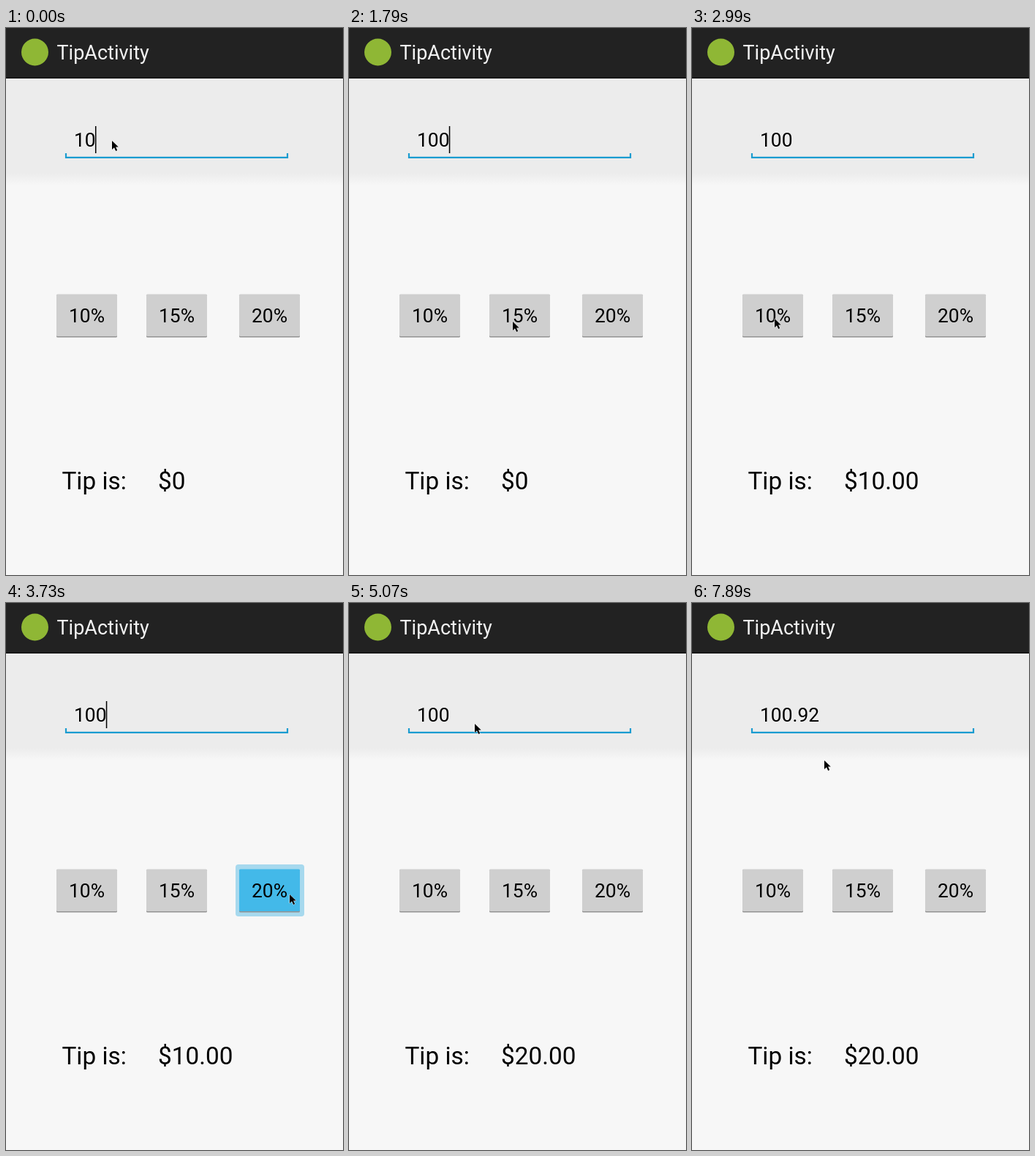
These frames come from a looping animation (461 px wide and 747 px high, 8000 ms). An HTML page:

```html
<!DOCTYPE html>
<html lang="en">
<head>
<meta charset="utf-8">
<title>TipActivity</title>
<style>
  html, body { margin: 0; width: 100%; height: 100%; overflow: hidden; background: #f7f7f7; }
  svg { display: block; width: 100%; height: 100%; }
  text { font-family: Roboto, sans-serif; font-size: 26.4px; white-space: pre; }
  .title { font-size: 27px; fill: #f2f2f2; }
  .result { font-size: 33.3px; }
</style>
</head>
<body>
<svg viewBox="0 0 461 747">
  <defs>
    <linearGradient id="fade" x2="0" y2="1">
      <stop stop-color="#ececec"/>
      <stop offset="1" stop-color="#f7f7f7"/>
    </linearGradient>
  </defs>
  <rect width="461" height="747" fill="#f7f7f7"/>
  <rect width="461" height="198" fill="#ececec"/>
  <rect y="198" width="461" height="17" fill="url(#fade)"/>
  <rect width="461" height="69" fill="#222"/>
  <rect y="67" width="461" height="2" fill="#181818"/>
  <circle cx="39.5" cy="33" r="18.5" fill="#8fb735"/>
  <text class="title" x="69.5" y="43">TipActivity</text>

  <path d="M82 171v5.8h303v-5.8" fill="none" stroke="#1a9cd0" stroke-width="2.2"/>
  <text id="field" x="93" y="162.3"></text>
  <rect id="caret" y="134" width="1.5" height="37"/>
  <path id="handle" d="M0 172L20 193V230Q20 233 17 233H-17Q-20 233 -20 230V193Z" fill="#33b5e5"/>

  <g id="buttons"></g>
  <text class="result" x="76.5" y="630">Tip is:</text>
  <text class="result" id="tip" x="208" y="630"></text>
  <path id="mouse" d="M0 0V12L3 9.3L5.2 14L7.2 13L5.1 8.6H8.8Z" stroke="#fff" paint-order="stroke"/>
</svg>
<script>
// All times in ms; the screen refreshes once per STEP
const LOOP = 8000, STEP = 148.8, BLINK = 505;
const $ = id => document.getElementById(id);

const edits = [
  { at: -360, text: '10' },
  { at: 380, text: '100' },
  { at: 5720, text: '100.' },
  { at: 6620, text: '100.9' },
  { at: 7250, text: '100.92' }
];
const clicks = [
  { at: 2000, percent: 15, hold: 150 },
  { at: 2900, percent: 10, hold: 0 },
  { at: 3800, percent: 20, hold: 150 }
];
const moves = [
  { from: 1040, to: 1780, x: 224, y: 401 },
  { from: 2230, to: 2520, x: 113, y: 397 },
  { from: 3120, to: 3710, x: 388, y: 398 },
  { from: 3870, to: 4605, x: 172, y: 165 },
  { from: 7740, to: 7880, x: 181, y: 215 }
];
const handleTime = { from: 5150, to: 5900 };

const latest = (list, t) => list.findLast(e => e.at <= t);
const within = (t, a, b) => t >= a && t < b;
const easeOut = k => 1 - (1 - k) ** 1.5;

function pointer(t) {
  let x = 145, y = 154;
  for (const m of moves) {
    const k = easeOut(Math.min(1, Math.max(0, (t - m.from) / (m.to - m.from))));
    x += (m.x - x) * k;
    y += (m.y - y) * k;
  }
  return [x, y];
}

const buttons = [[10, 69], [15, 192], [20, 319]].map(([percent, x]) => {
  const g = document.createElementNS('http://www.w3.org/2000/svg', 'g');
  g.setAttribute('transform', `translate(${x} 363)`);
  g.innerHTML = `
    <rect class="glow" x="-5" y="-6" width="94" height="71" rx="4" fill="#a7d9ee"/>
    <rect y="1" width="83" height="58.5" rx="1.5" fill="#929292"/>
    <rect class="face" y=".4" width="83" height="57.6" rx="1.5"/>
    <text x="41.5" y="39" text-anchor="middle">${percent}%</text>`;
  $('buttons').append(g);
  return { percent, glow: g.querySelector('.glow'), face: g.querySelector('.face') };
});

function show(el, on) { el.style.visibility = on ? 'visible' : 'hidden'; }

function draw(time) {
  const t = Math.floor((time % LOOP + 4) / STEP) * STEP;

  // Typing restarts the caret's blink
  const edit = latest(edits, t);
  $('field').textContent = edit.text;
  const end = 93 + $('field').getComputedTextLength();
  $('caret').setAttribute('x', end - 0.7);
  show($('caret'), Math.floor((t - edit.at) / BLINK) % 2 === 0);
  $('handle').setAttribute('transform', `translate(${end} 0)`);
  show($('handle'), within(t, handleTime.from, handleTime.to));

  // The tip is worked out from the amount entered when the button was released
  const click = latest(clicks, t);
  $('tip').textContent = '$' +
    (click ? (latest(edits, click.at).text * click.percent / 100).toFixed(2) : 0);

  for (const b of buttons) {
    const down = clicks.some(c => c.percent === b.percent && within(t, c.at - c.hold, c.at));
    show(b.glow, down);
    b.face.setAttribute('fill', down ? '#43b9e9' : '#cfcfcf');
  }

  $('mouse').setAttribute('transform', `translate(${pointer(t)})`);
}

let start;
function tick(now) {
  start ??= now;
  draw(now - start);
  requestAnimationFrame(tick);
}
draw(0);
requestAnimationFrame(tick);
</script>
</body>
</html>
```
